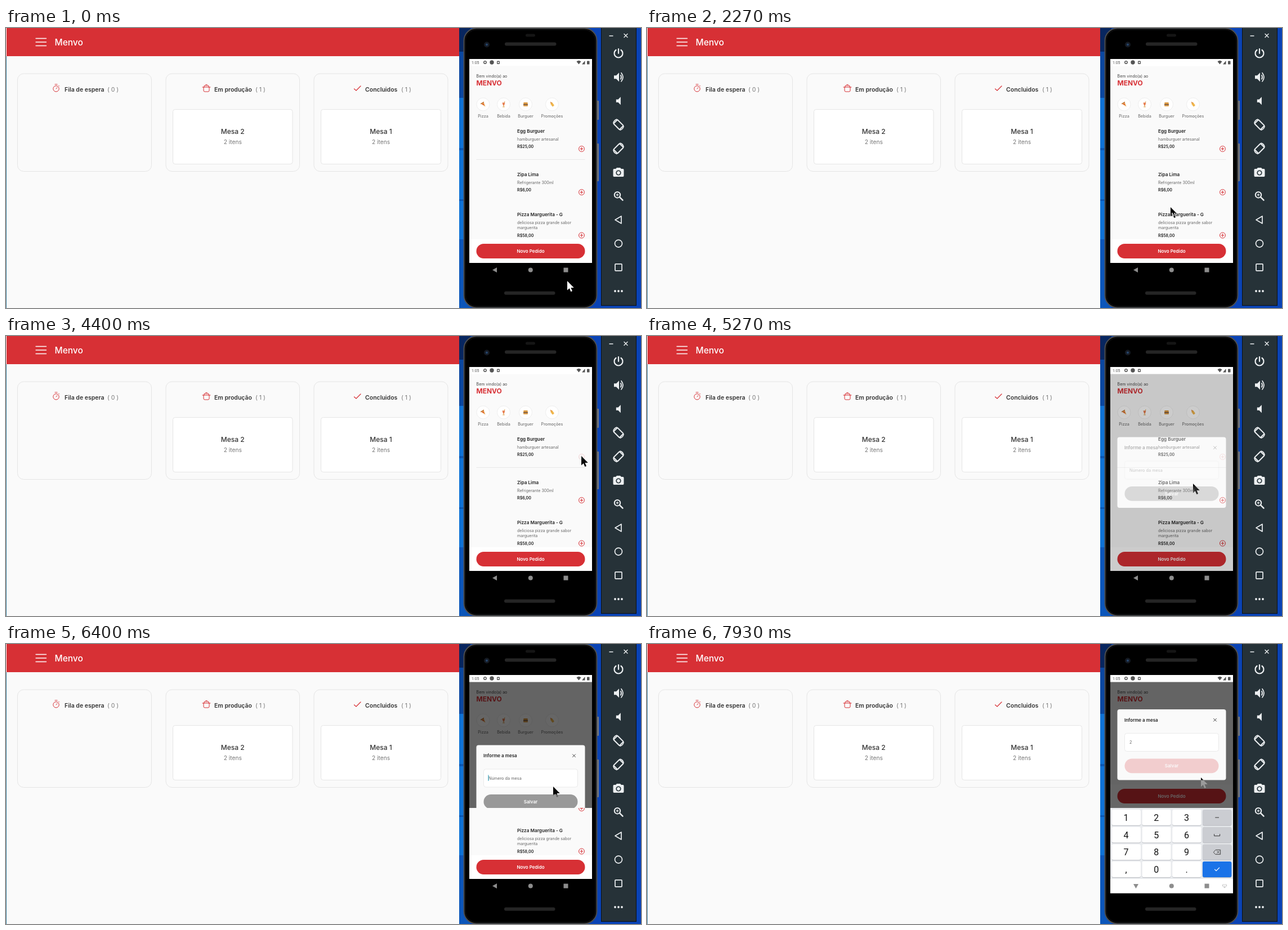
Write an HTML page that moves like this. It is 1128 by 497 pixels and loops after 8000 ms.

```html
<!DOCTYPE html>
<html lang="pt-BR">
<head>
<meta charset="utf-8">
<title>Pedidos</title>
<style>
html, body { margin: 0; width: 100%; height: 100%; overflow: hidden; background: #fafafa; }
svg { display: block; width: 100vw; height: 100vh; }
text { font-family: Inter, sans-serif; white-space: pre; }
.key { font-family: Roboto, sans-serif; }
.line { fill: none; stroke-linecap: round; stroke-linejoin: round; }
#cursor { mix-blend-mode: difference; }
</style>
</head>
<body>
<svg id="stage" viewBox="0 0 1128 497" xmlns="http://www.w3.org/2000/svg"></svg>
<script>
const RED = '#d73035', PAGE = '#fafafa', LOOP = 8000, STEP = 1000 / 15;

const rect = (x, y, w, h, fill, r = 0, more = '') =>
  `<rect x="${x}" y="${y}" width="${w}" height="${h}" rx="${r}" fill="${fill}" ${more}/>`;
const circle = (x, y, r, fill, more = '') =>
  `<circle cx="${x}" cy="${y}" r="${r}" fill="${fill}" ${more}/>`;
const text = (x, y, s, size, weight = 400, fill = '#222', anchor = 'start', more = '') =>
  `<text x="${x}" y="${y}" font-size="${size}" font-weight="${weight}" fill="${fill}" text-anchor="${anchor}" ${more}>${s}</text>`;
const line = (d, color, w = 1, more = '') =>
  `<path class="line" d="${d}" stroke="${color}" stroke-width="${w}" ${more}/>`;
const shape = (d, fill, more = '') => `<path d="${d}" fill="${fill}" ${more}/>`;
const at = (x, y, s, more = '') => `<g transform="translate(${x} ${y})${more}">${s}</g>`;

function column(x, w, icon, iconX, title, titleX, count, countX, table) {
  const mid = x + w / 2;
  let s = rect(x, 81, w, 173.5, PAGE, 11, 'stroke="#e5e5e5"') + at(iconX, 107, icon) +
    text(titleX, 113, title, 10.5, 600, '#333') + text(countX, 113, `( ${count} )`, 10.5, 400, '#777');
  if (table) s += rect(x + 12.5, 144.5, w - 25, 97, '#fff', 4, 'stroke="#e5e5e5"') +
    text(mid, 188, table, 12, 500, '#333', 'middle') +
    text(mid, 206, '2 itens', 10.2, 400, '#777', 'middle');
  return s;
}

function board() {
  const timer = circle(0, .8, 5.2, 'none', `stroke="${RED}"`) + line('M-2-7H2M0 1L2-1.5M4.5-5L5.5-4', RED);
  const pot = line('M-5-2V4Q-5 6-3 6H3Q5 6 5 4V-2M-7-2H7M-4-2V-4.5H4V-2M-1.5-6.5H1.5', RED);
  const check = line('M-5.5 1L-2 4L6-4', RED, 1.2);
  return rect(0, 0, 806, 497, PAGE) + rect(0, 50, 1, 447, '#3b7f9c') + rect(1, 0, 804.5, 50, RED) +
    line('M53 18.5H71.500M53 25H71.500M53 31.500H71.500', '#fff', 1.3) +
    text(86.5, 31, 'Menvo', 15.5, 500, '#fff') +
    column(20.5, 238, timer, 89, 'Fila de espera', 104, 0, 180) +
    column(284, 237.5, pot, 356, 'Em produção', 370, 1, 443, 'Mesa 2') +
    column(547, 238, check, 624, 'Concluidos', 638, 1, 702, 'Mesa 1');
}

function desktop() {
  return rect(805, 0, 323, 497, '#0a43b5') + rect(805, 0, 20, 497, '#0b47a0') +
    rect(805, 0, 20, 42, '#08265f') + rect(805, 124, 20, 251, '#0f72d6') +
    rect(805, 213, 20, 4, '#0a57b4') + rect(805, 304, 20, 3, '#0a57b4') +
    rect(805, 375, 20, 122, '#0c56ba');
}

function phoneBody() {
  return rect(1048, 129, 5, 34, '#77797c', 1) + rect(1048, 205, 5, 67, '#77797c', 1) +
    rect(813.5, .5, 236, 496, '#000', 22, 'stroke="#4b4d50" stroke-width="2"') +
    rect(816, 3, 231, 491, '#000', 20, 'stroke="#17181a"') +
    rect(923, 10.5, 17, 5, '#151515', 2.5) + rect(886, 25.5, 91.5, 6, '#252525', 3) +
    rect(885, 467.500, 90.5, 6, '#252525', 3) +
    circle(854, 29.500, 5, '#151a22') + circle(854, 29.500, 2, '#26456b');
}

function toolbar() {
  const W = '#eceff1';
  const speaker = shape('M-8-3H-4L1-8V8L-4 3H-8Z', W);
  const turn = rect(-5, -7.500, 10, 15, 'none', 1, `stroke="${W}" stroke-width="2" transform="rotate(-45)"`) +
    line('M-9-3Q-8-8-3-9.500M9 3Q8 8 3 9.500', W, 1.8);
  const icons = [
    line('M-4.500-6A7.500 7.500 0 1 0 4.500-6M0-8V0', W, 2.2),
    speaker + line('M4-3.500Q6 0 4 3.500M5-7.500Q11 0 5 7.500', W, 1.8),
    at(3, 0, speaker, ' scale(.9)'),
    turn,
    `<g transform="scale(-1 1)">${turn}</g>`,
    shape('M-8-6H-5L-3-8H3L5-6H8Q9.500-6 9.500-4V6Q9.500 8 8 8H-8Q-9.500 8-9.500 6V-4Q-9.500-6-8-6Z', W) +
      circle(0, 1, 4.600, '#263238') + circle(0, 1, 2.900, W),
    circle(-2, -2, 5.200, 'none', `stroke="${W}" stroke-width="2"`) + line('M2 2L7.500 7.500', W, 2.4) +
      line('M-4-2H0M-2-4V0', W, 1.2),
    line('M5-6.500V6.500L-6 0Z', W, 1.7),
    circle(0, 0, 6.500, 'none', `stroke="${W}" stroke-width="1.700"`),
    rect(-6, -6, 12, 12, 'none', 1, `stroke="${W}" stroke-width="1.700"`),
    [-6, 0, 6].map(x => circle(x, 0, 1.900, W)).join('')
  ];
  return rect(1057.5, -1, 62, 493.5, '#263238', 0, 'stroke="#0b0f12"') +
    line('M1072 14H1078M1098 10.500L1104 16.500M1104 10.500L1098 16.500', W, 1.400) +
    icons.map((s, i) => at(1088, 45 + i * 42.2, s)).join('');
}

function statusBar() {
  const G = '#555';
  return rect(823, 55, 218, 12.5, '#fff') + text(827, 64, '1:05', 7, 400, G, 'start', 'class="key"') +
    circle(851, 61, 2.2, 'none', `stroke="${G}" stroke-width="1.500"`) + circle(863, 61, 3.7, G) +
    rect(872, 58.500, 5, 5.500, G, 1) + rect(873.300, 60, 2.400, 2.500, '#fff') +
    shape('M1013.500 59.500Q1017.500 56 1021.500 59.500L1017.500 64.500Z', G) +
    shape('M1023 64.500H1028.500V58Z', G) + rect(1032, 58.500, 4.500, 6, G, .6);
}

const foods = [
  ['Pizza', 847.5, shape('M-4-1L1-4L4 4Z', '#e8a04c') + circle(0, 0, 1, RED) + line('M-4-1L1-4', '#b66a2e', 1.3)],
  ['Bebida', 884, shape('M-2.500-3H2.500L1 2H-1Z', '#e77b4e') + line('M0 2V4M-1.500 4.500H1.500M1-3L2-5', '#d8a04a')],
  ['Burguer', 923, rect(-4, -3.500, 8, 3, '#dc9b45', 1.500) + rect(-4, -.5, 8, 1.700, '#6c4628') + rect(-4, 1.200, 8, 2.300, '#dc9b45', 1)],
  ['Promoções', 970, rect(-1.800, -3, 4, 7, '#f0b64c', 1, 'transform="rotate(-35)"') + rect(-.6, -5, 1.600, 3, '#dd8d45', 0, 'transform="rotate(-35)"')]
];

function item(y, name, desc, price, id) {
  const last = y + 3 + desc.length * 10;
  return text(908, y, name, 8.2, 600, '#222') +
    desc.map((d, i) => text(908, y + 14 + i * 9.300, d, 7.100, 400, '#666')).join('') +
    text(908, y + (desc.length > 1 ? 37 : 27.500), price, 7.1, 600, '#222') +
    `<g id="${id}">` + at(1022.5, y + (desc.length > 1 ? 34 : 29),
      circle(0, 0, 5, 'none', `stroke="${RED}"`) + line('M-2.500 0H2.500M0-2.500V2.500', RED)) + '</g>';
}

function app() {
  return rect(823, 67, 218, 350, PAGE) +
    text(835.5, 88, 'Bem vindo(a) ao', 7.1, 400, '#444') +
    text(835.5, 102, 'MENVO', 12, 700, RED) +
    foods.map(([s, x, icon]) => circle(x, 135.500, 11.500, '#fff', 'stroke="#eee"') + at(x, 135.500, icon) +
      text(x, 158.500, s, 7.2, 500, '#777', 'middle')).join('') +
    item(185.5, 'Egg Burguer', ['hamburguer artesanal'], 'R$25,00', 'plus') +
    rect(835.5, 233, 193, 1, '#e8e8e8') +
    item(262.5, 'Zipa Lima', ['Refrigerante 300ml'], 'R$6,00', 'plus2') +
    item(334, 'Pizza Marguerita - G', ['deliciosa pizza grande sabor', 'marguerita'], 'R$58,00', 'plus3') +
    '<g id="footer">' + rect(823, 375, 218, 168, '#fff') + rect(835.5, 383, 193, 26, RED, 13) +
    text(932, 398.7, 'Novo Pedido', 8, 600, '#fff', 'middle') + '</g>';
}

function modal() {
  return rect(823, 67, 218, 350, '#000', 0, 'opacity=".6"') + '<g id="modal">' +
    rect(835.5, 179.500, 193, 125.500, PAGE, 4) + text(848, 201, 'Informe a mesa', 8, 600, '#222') +
    line('M1006.500 195.800L1011.500 200.800M1011.500 195.800L1006.500 200.800', '#444') +
    rect(848.5, 222, 167, 32, '#fff', 4, 'stroke="#eaeaea"') +
    text(857, 240.600, '', 7.3, 400, '#666', 'start', 'id="field"') +
    rect(856.5, 232.500, 1, 10.500, '#1598b5', 0, 'id="caret"') +
    '<g id="save">' + rect(848.5, 267, 167, 25.800, '#999', 13, 'id="saveBg"') +
    text(932, 282.700, 'Salvar', 8, 600, '#fff', 'middle') + '</g></g>';
}

function keyboard() {
  const labels = ['1', '2', '3', '', '4', '5', '6', '', '7', '8', '9', '', ',', '0', '.', ''];
  const side = [
    line('M-3 0H3', '#333'), line('M-5-1V2H5V-1', '#333'),
    line('M-6 0L-2.500-4H6V4H-2.500ZM0-2L4 2M4-2L0 2', '#444'), line('M-4 0L-1.500 2.500L4-3', '#fff', 1.300)
  ];
  const keys = labels.map((s, i) => {
    const c = i % 4, r = i >> 2, x = 825.5 + c * 53.800, y = 294 + r * 30.700;
    const fill = c < 3 ? '#fff' : r < 3 ? '#cbcdd2' : '#1a73e8';
    return rect(x, y + 1, 51.500, 27.800, '#b9bcc1', 3) + rect(x, y, 51.500, 27.800, fill, 3, `id="key${i}"`) +
      (c < 3 ? text(x + 25.500, y + 20, s, 16, 400, '#111', 'middle', 'class="key"') : at(x + 25.700, y + 14, side[r]));
  });
  return rect(823, 291, 218, 126, '#e9ebee') + keys.join('');
}

function navBar() {
  return rect(823, 417, 218, 25.500, '#fff', 0, 'id="navBg"') +
    `<g id="back" fill="#8d8d8d"><path d="M864 429.500L872 425V434Z"/></g>` +
    circle(931.8, 429.500, 4, '#8d8d8d') + rect(990.5, 425.500, 8, 8, '#8d8d8d') +
    '<g id="kbIcon">' + rect(1022.5, 427, 7, 3, 'none', 0, 'stroke="#999" stroke-dasharray="1 1"') +
    rect(1024.5, 431.500, 3, 1, '#999') + '</g>';
}

const stage = document.getElementById('stage');
stage.innerHTML = `<defs>
  <clipPath id="screen"><rect x="823" y="55" width="218" height="362"/></clipPath>
  <clipPath id="overlayClip"><rect id="overlayBox" x="823" y="67" width="218" height="350"/></clipPath></defs>` +
  board() + desktop() + phoneBody() + toolbar() +
  `<g clip-path="url(#screen)">${app()}<g clip-path="url(#overlayClip)"><g id="overlay">${modal()}</g></g>
  <g id="keyboard">${keyboard()}</g>${statusBar()}</g>` + navBar() +
  shape('M0 0V16.500L3.800 13L6.400 19L9 17.900L6.500 12H11.800Z', '#fff', 'id="cursor"');

const el = id => document.getElementById(id);
const set = (id, name, v) => el(id).setAttribute(name, v);
const ramp = (t, a, b) => Math.max(0, Math.min(1, (t - a) / (b - a)));

// Pointer way-points: time, x, y
const path = [
  [0, 997, 449], [200, 706, 400], [330, 860, 313], [467, 1016, 349], [733, 1016, 349], [1000, 941, 313],
  [1400, 942, 314], [1933, 942, 314], [2267, 930, 318], [2600, 862, 260], [2800, 868, 228],
  [3130, 1040, 211], [3267, 1040, 211], [3667, 1022, 213], [4600, 1022, 213], [5267, 970, 262],
  [5467, 1002, 321], [5800, 983, 236], [6267, 983, 236], [6400, 972, 253], [6600, 945, 286],
  [6733, 908, 309], [6867, 908, 309], [7133, 1010, 249], [7400, 990, 222], [7733, 984, 222], [7933, 984, 245]
];

function pointer(t) {
  const i = path.findIndex(p => p[0] > t);
  if (i < 0) return path[path.length - 1].slice(1);
  const [a, b] = [path[i - 1], path[i]], k = ramp(t, a[0], b[0]);
  return [1, 2].map(n => Math.round(a[n] + (b[n] - a[n]) * k));
}

function draw(ms) {
  const t = Math.floor((ms + 1) / STEP) * STEP;
  const typed = t > 6790, lifted = t > 6520;
  set('cursor', 'transform', `translate(${pointer(t)})`);
  set('plus', 'opacity', t > 4390 ? .2 : 1);

  set('overlay', 'opacity', ramp(t, 5170, 5460));
  set('overlayBox', 'height', t > 6390 ? 224 : 350);
  set('modal', 'transform', `translate(0 ${lifted ? -63.500 : 0})`);
  set('footer', 'transform', `translate(0 ${lifted ? -126 : 0})`);
  set('keyboard', 'transform', `translate(0 ${126 * (1 - ramp(t, 6420, 6590))})`);
  set('keyboard', 'visibility', t > 6420 ? 'visible' : 'hidden');
  for (const id of ['navBg', 'kbIcon']) set(id, 'visibility', t > 6450 ? 'visible' : 'hidden');
  set('back', 'transform', `rotate(${-90 * ramp(t, 6600, 6800)} 868.500 429.500)`);

  el('field').textContent = typed ? '2' : 'Número da mesa';
  set('caret', 'x', typed ? 862 : 856.5);
  set('caret', 'visibility', t > 6060 && t < 7320 ? 'visible' : 'hidden');
  set('key1', 'fill', t > 6720 && t < 6860 ? '#d8dade' : '#fff');
  set('saveBg', 'fill', typed ? RED : '#999');
  set('save', 'opacity', 1 - .8 * ramp(t, 7730, 7870));
}

const start = performance.now();
function tick() {
  draw((performance.now() - start) % LOOP);
  requestAnimationFrame(tick);
}
draw(0);
tick();
</script>
</body>
</html>
```
